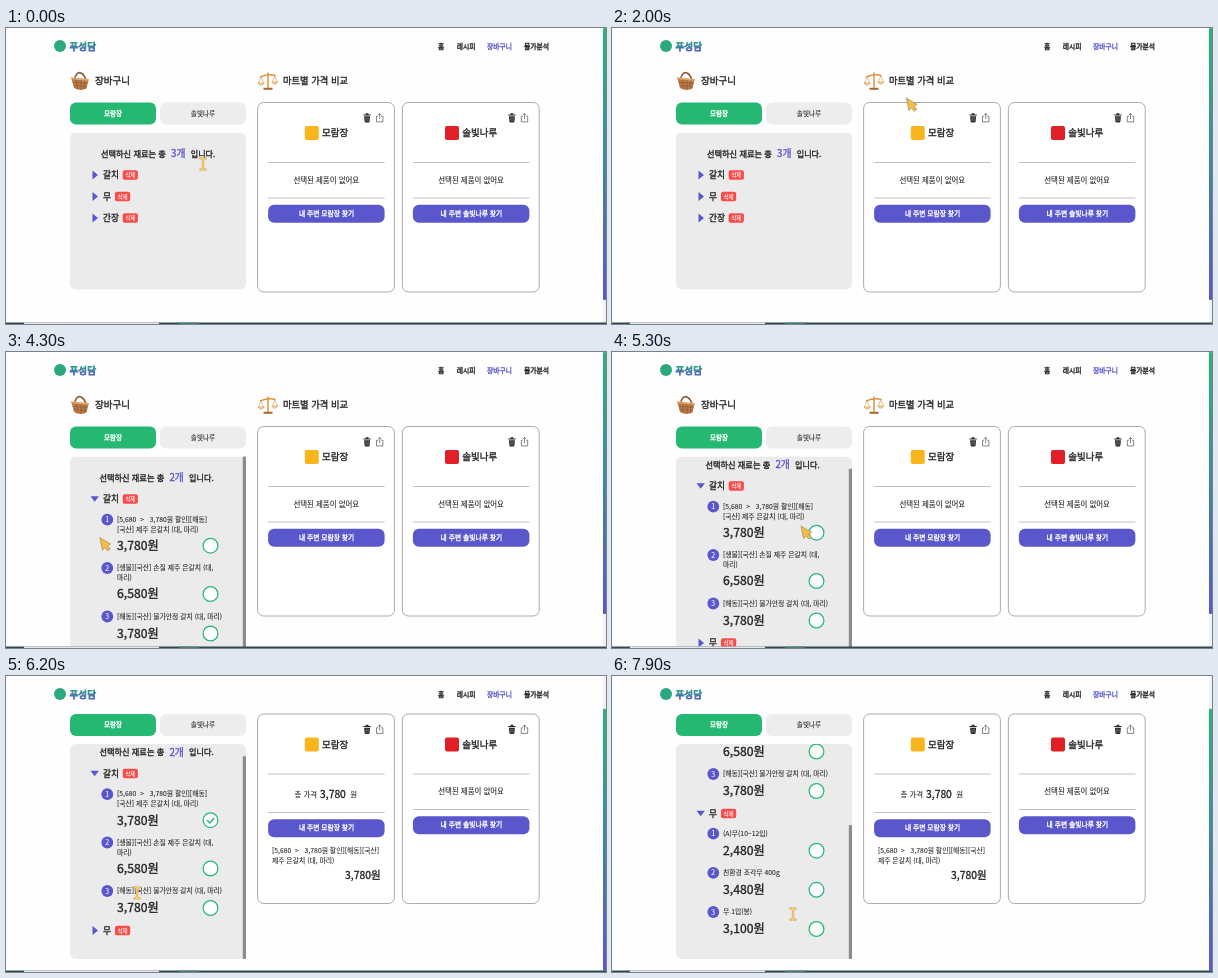
Write an HTML page that moves like this. It is 600 px wide and 296 px high and loops after 8000 ms.

```html
<!DOCTYPE html>
<html lang="ko">
<head>
<meta charset="utf-8">
<title>장바구니</title>
<style>
  html, body { margin: 0; width: 100%; height: 100%; overflow: hidden; background: #fefefe; }
  svg { display: block; width: 600px; height: 296px; }
  text {
    font-family: "Noto Sans CJK KR", "Noto Sans CJK", "Noto Sans", sans-serif;
    color: #222; fill: currentColor; stroke: currentColor; stroke-width: .08; white-space: pre;
  }
  .m { stroke-width: .32; }
  .b { stroke-width: .9; fill: url(#bar); stroke: url(#bar); }
  .mid { text-anchor: middle; }
  .end { text-anchor: end; }
  .w { color: #fff; }
  .p { color: #5a57cc; }
</style>
</head>
<body>
<svg viewBox="0 0 600 296">
  <defs>
    <linearGradient id="bar" x2="0" y2="1">
      <stop stop-color="#25b873"/><stop offset="1" stop-color="#5a57cc"/>
    </linearGradient>
    <clipPath id="clip"><rect id="clipBox" x="64" y="104.5" width="176" height="157" rx="6"/></clipPath>
    <g id="trash" fill="#2b2b2b">
      <path d="M.3 1.3h7.4v1.1H.3zM2.6 0h2.8v1.3H2.6z"/>
      <path d="M1 3h6l-.5 5.4q-.1.8-.8.8H2.3q-.7 0-.8-.8z"/>
      <path d="M2.8 4v4M4 4v4M5.2 4v4" stroke="#aaa" stroke-width=".4"/>
    </g>
    <path id="share" d="M2 3.2H.5v5.6h6.4V3.2H5.4M3.7 6V.5M2 2.1L3.7.4l1.7 1.7" fill="none" stroke="#444" stroke-width=".65"/>
    <path id="arrow" d="M0 0L2.6 12.6 5 9.8l3 3.4 2.4-2L7.6 8l3.2-1.6z" fill="#f6bd45" stroke="#a08a5e" stroke-width=".7" stroke-linejoin="round"/>
    <g id="beam" fill="none" stroke-linecap="round">
      <path d="M-2.6-5.6Q0-5.6 0-4V4Q0 5.6-2.6 5.6M2.6-5.6Q0-5.6 0-4M0 4Q0 5.6 2.6 5.6" stroke="#c09a50" stroke-width="2.3"/>
      <path d="M-2.6-5.6Q0-5.6 0-4V4Q0 5.6-2.6 5.6M2.6-5.6Q0-5.6 0-4M0 4Q0 5.6 2.6 5.6" stroke="#fbd070" stroke-width="1.5"/>
    </g>
    <path id="hand" d="M-.8 0Q0-.9.8 0V3l3 .7q.8.3.7 1.1L4 7.6H0L-2.6 4.6q0-1 1-.6l.8.6z" fill="#fff" stroke="#222" stroke-width=".7"/>
  </defs>

  <rect width="600" height="296" fill="#fefefe"/>
  <g id="page">
    <g id="basket">
      <path d="M68 53Q70 43 75 45Q79 47 80 53" fill="none" stroke="#8a5a35" stroke-width="1.6"/>
      <path d="M65.5 50.5L82.5 52 80.5 60.5Q74 63.5 68 60z" fill="#b97a48"/>
      <path d="M65 50.2L82.8 52" stroke="#e0a66b" stroke-width="1.8"/>
      <path d="M66.5 54.3l15 1M67.5 57.6l13.4.8M70.5 52l1 9M75 52.4v9.4M79 52.7l-.8 8.7" stroke="#8d5731" stroke-width=".6"/>
    </g>
    <g id="scales" fill="none" stroke="#d9953f">
      <path d="M262 44.5V60M254 49Q262 45.5 269.5 47.5" stroke-width="1.5"/>
      <path d="M255 49l-2.6 6M255 49l2.8 6M268.8 48l-2.6 6M268.8 48l2.6 6" stroke-width=".6"/>
      <path d="M252 55h6.4q-3.2 4.4-6.4 0zM265.8 54h6q-3 4.4-6 0z" fill="#efe1c8" stroke-width=".7"/>
      <path d="M257.5 60.8h9" stroke-width="2" stroke="#a8672b"/>
    </g>
    <g id="body"></g>
  </g>
  <g id="head"></g>
  <rect x="597" width="3" height="296" fill="#f1f1f1"/>
  <rect id="thumb" x="597" width="3" height="272" rx="1" fill="url(#bar)"/>
  <path d="M0 295.3H600" stroke="#2f4a52" stroke-width="1.4"/>
  <path d="M18 295.3H153" stroke="#e4e6e7" stroke-width="1.4"/>
  <path d="M173 295.3h20" stroke="#4f7d6c" stroke-width="1.4"/>
  <use id="cursor"/>
</svg>
<script>
const GREEN = '#25b873', PURPLE = '#5a57cc';
const STORE_A = '모람장', STORE_B = '솔빛나루';
const $ = id => document.getElementById(id);

// y is the optical middle of the line
const text = (x, y, size, str, cls = '') =>
  `<text x="${x}" y="${y + size * .36}" font-size="${size}" class="${cls}">${str}</text>`;
const box = (x, y, w, h, r, fill, more = '') =>
  `<rect x="${x}" y="${y}" width="${w}" height="${h}" rx="${r}" fill="${fill}" ${more}/>`;

const row = (id, y, name, badgeX) => `<g id="${id}" fill="${PURPLE}">
  <path class="shut" d="M86.5 ${y - 4.5}l5.5 4.5-5.5 4.5z"/>
  <path class="open" d="M84.5 ${y - 2.7}h8.4l-4.2 5.4z"/>
  ${text(97, y, 8.7, name, 'm')}
  ${box(badgeX, y - 4.8, 15.2, 9.6, 2, '#fa4a4a')}
  ${text(badgeX + 7.6, y, 5.6, '삭제', 'w mid')}</g>`;

const item = (n, y, lines, price) => {
  const py = y + (lines.length > 1 ? 26 : 17);
  return `<circle cx="101.3" cy="${y}" r="5.9" fill="${PURPLE}"/>` +
    text(101.3, y, 7, n, 'w mid') +
    lines.map((s, i) => text(111, y + i * 10 - .3, 6.83, s)).join('') +
    text(111, py, 12.2, price + '원', 'm') +
    `<circle cx="204.5" cy="${py}" r="7.4" fill="#fff" stroke="${GREEN}" stroke-width="1.2"/>`;
};

const card = (x, name, color, markX, extra) => `<g transform="translate(${x} 74.5)">
  ${box(0, 0, 136.8, 189.5, 6, '#fff', 'stroke="#888" stroke-width=".7"')}
  <use href="#trash" x="105.5" y="10.7"/><use href="#share" x="118.4" y="10.6"/>
  ${box(markX, 23.5, 14, 14, 2, color)}
  ${text(markX + 17.3, 30.5, 9.5, name, 'm')}
  <path d="M10.5 60H127" stroke="#b0b0b0" stroke-width=".8"/>
  <g class="none">${text(68.7, 77.7, 7.45, '선택된 제품이 없어요', 'mid')}</g>
  <g class="action">
    <path d="M10.5 95.5H127" stroke="#b0b0b0" stroke-width=".8"/>
    ${box(10.5, 102.3, 116.5, 18, 6, PURPLE)}
    ${text(69, 110.8, 6.75, `내 주변 ${name} 찾기`, 'w m mid')}
  </g>${extra}</g>`;

const sale = '[5,680 \u00a0&gt; \u00a0\u00a03,780원 할인][해동]';
const picked = `<g id="picked">
  ${text(37, 80, 7.4, '총 가격')}${text(62.5, 80, 10.3, '3,780', 'm')}${text(92.7, 80, 7.4, '원')}
  ${text(14.3, 136.5, 6.83, sale + '[국산]')}${text(14.3, 146.8, 6.83, '제주 은갈치 (대, 마리)')}
  ${text(123, 161.7, 10.4, '3,780원', 'm end')}</g>`;

$('body').innerHTML =
  text(89, 52.3, 9.5, '장바구니', 'm') + text(277, 52.3, 9.3, '마트별 가격 비교', 'm') +
  box(64, 74.5, 86, 22, 6, GREEN) + text(107, 85.3, 6.6, STORE_A, 'w m mid') +
  box(154, 74.5, 86, 22, 6, '#ededed') + text(197, 85.3, 6.6, STORE_B, 'mid') +
  `<g clip-path="url(#clip)">${box(64, 104.5, 176, 215, 0, '#ebebeb')}<g id="list">
    <g id="title">${text(95, 126, 8.2, '선택하신 재료는 총', 'm')}
      <text id="count" x="165" y="129.2" font-size="9.8" class="p m"></text>
      ${text(184.7, 126, 8.1, '입니다.', 'm')}</g>
    ${row('fish', 147, '갈치', 116.7)}
    <g id="fishItems">
      ${item(1, 167.7, [sale, '[국산] 제주 은갈치 (대, 마리)'], '3,780')}
      ${item(2, 216, ['[생물][국산] 손질 제주 은갈치 (대,', '마리)'], '6,580')}
      ${item(3, 264.5, ['[해동][국산] 물가안정 갈치 (대, 마리)'], '3,780')}
      <path id="check" d="M201 193.8l2.7 2.7 4.6-5" fill="none" stroke="${GREEN}" stroke-width="1.4"/>
    </g>
    <g id="radishBox">${row('radish', 168.5, '무', 109)}
      <g id="radishItems">
        ${item(1, 188.7, ['(A)무(10~12입)'], '2,480')}
        ${item(2, 227.8, ['친환경 조각무 400g'], '3,480')}
        ${item(3, 267, ['무 1입(봉)'], '3,100')}
      </g></g>
    ${row('soy', 190, '간장', 116.7)}
  </g></g><rect id="inner" x="236.8" width="3.2" rx=".8" fill="#8c8c8c"/>` +
  card(251.6, STORE_A, '#f9b51c', 47.2, picked) +
  card(396.4, STORE_B, '#e01f26', 42.6, '');

$('head').innerHTML = box(0, 0, 597, 36, 0, '#fefefe') +
  `<circle cx="54" cy="18" r="6" fill="#2aa981"/>` +
  text(63.5, 18.2, 9.6, '푸성담', 'b') +
  [[432, '홈'], [450.8, '레시피'], [481, '장바구니'], [518, '물가분석']]
    .map(([x, s]) => text(x, 18.3, 6.8, s, x === 481 ? 'm p' : 'm')).join('');

const path = [
  [0, 197, 136], [250, 190, 143], [900, 118, 189], [1400, 118, 189], [2200, 327, 48], [2800, 327, 48],
  [3600, 89, 147], [3850, 89, 147], [4200, 92, 184], [4700, 110, 200], [5300, 189, 174],
  [5500, 204, 180], [5750, 204, 180], [6200, 131, 217], [6500, 89, 254], [6800, 89, 254],
  [7200, 160, 232], [7600, 181, 238], [8000, 181, 238]
];
const shapes = [[0, 'beam'], [300, 'arrow'], [800, 'hand'], [1500, 'arrow'], [2600, 'beam'], [2900, 'arrow'],
  [3500, 'hand'], [4000, 'arrow'], [5400, 'hand'], [5800, 'arrow'], [6100, 'beam'], [6400, 'hand'],
  [6900, 'arrow'], [7500, 'beam']];
const listScroll = [[0, 0], [4500, 0], [4800, 13], [7000, 13], [7500, 130], [8000, 130]];
const pageScroll = [[0, 0], [5800, 0], [6100, 36.5], [8000, 36.5]];

function at(keys, t, col = 1) {
  const i = keys.findIndex(k => k[0] > t), a = keys[i - 1], b = keys[i];
  const u = (t - a[0]) / (b[0] - a[0]);
  return a[col] + (b[col] - a[col]) * u * u * (3 - 2 * u);
}
const show = (el, on) => { el.style.display = on ? '' : 'none'; };
const shift = (el, x, y) => el.setAttribute('transform', `translate(${x} ${y})`);
function toggle(id, open) {
  show($(id).querySelector('.open'), open);
  show($(id).querySelector('.shut'), !open);
}

const emptyNote = document.querySelector('.none'), action = document.querySelector('.action');

function draw(t) {
  const removed = t >= 2600, fish = t >= 3800, checked = t >= 5600, radish = t >= 6700;
  const sy = at(listScroll, t), py = at(pageScroll, t), height = fish ? 215 : 157;
  const content = radish ? 345 : 228;

  $('count').textContent = removed ? '2개' : '3개';
  show($('soy'), !removed);
  toggle('soy', false);
  toggle('fish', fish);
  toggle('radish', radish);
  show($('fishItems'), fish);
  show($('radishItems'), radish);
  show($('check'), checked);
  show($('picked'), checked);
  show(emptyNote, !checked);
  shift(action, 0, checked ? 3 : 0);
  shift($('title'), fish ? -1.6 : 0, 0);
  shift($('radishBox'), 0, fish ? 135.5 : 0);
  shift($('list'), 0, -sy);
  shift($('page'), 0, -py);

  $('clipBox').setAttribute('height', height);
  show($('inner'), fish);
  $('inner').setAttribute('y', 104.5 + sy * 215 / content);
  $('inner').setAttribute('height', 215 * 215 / content);
  $('thumb').setAttribute('y', py * .9);
  $('thumb').setAttribute('height', fish ? 262 : 272);

  $('cursor').setAttribute('href', '#' + shapes.filter(s => s[0] <= t).pop()[1]);
  shift($('cursor'), at(path, t), at(path, t, 2));
}

const start = performance.now();
function tick() {
  draw(Math.floor((performance.now() - start) % 8000 / 100) * 100);
  requestAnimationFrame(tick);
}
tick();
</script>
</body>
</html>
```
